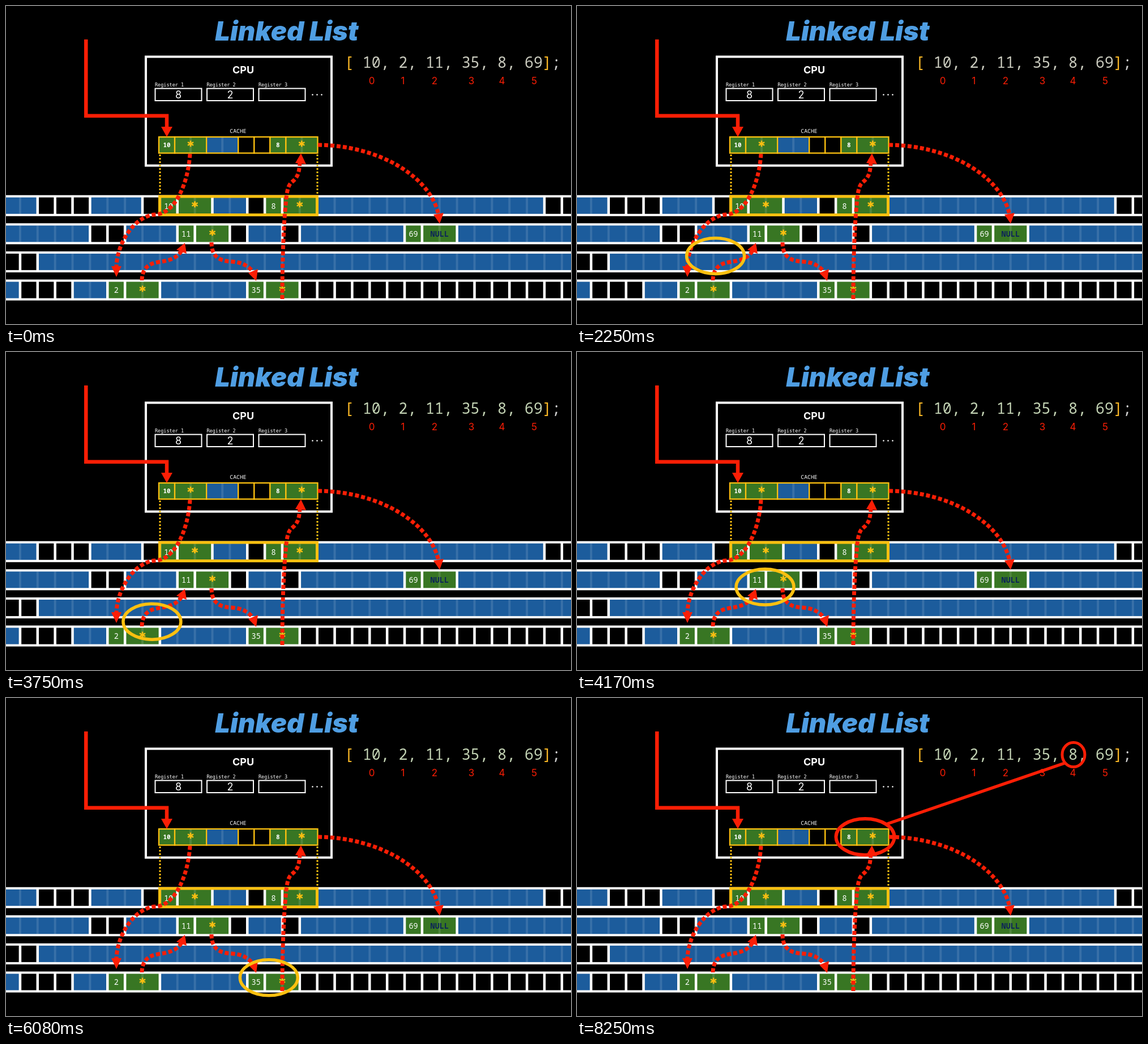
An HTML page for the animation above (9.54 s loop, 998 px wide and 561 px high).

```html
<!DOCTYPE html>
<html lang="en">
<head>
<meta charset="utf-8">
<title>Linked List</title>
<style>
  html, body { margin: 0; width: 100%; height: 100%; overflow: hidden; background: #000; }
  svg { display: block; width: 998px; height: 561px; }
  text { fill: #fff; }
  .mono { font-family: "Noto Sans Mono", monospace; }
  .sans { font-family: Inter, sans-serif; }
  .mid { text-anchor: middle; }
  .star { font: bold 21px "DejaVu Sans Mono", monospace; fill: #fcc010; stroke: #fcc010; stroke-width: .8; text-anchor: middle; }
  .line { fill: none; stroke: #fb1e05; stroke-width: 6.5; }
  .dots { stroke-width: 7; stroke-dasharray: 7 4; }
  .head { fill: #fb1e05; }
  .white { fill: none; stroke: #fff; stroke-width: 2; }
  .gold { fill: none; stroke: #fcc010; }
</style>
</head>
<body>
<svg viewBox="0 0 998 561">
  <text class="mid" x="496" y="61" style="font:italic 900 47px Inter,sans-serif;fill:#4f9ee3">Linked List</text>
  <text id="array" class="mono" x="598" y="109" font-size="26.5"><tspan fill="#fcb926">[</tspan> 10, 2, 11, 35, 8, 69<tspan fill="#fcb926">]</tspan><tspan fill="#d0d0d0">;</tspan></text>
  <g id="indices"></g>

  <rect class="white" x="247" y="89.5" width="328" height="192" style="stroke-width:4"/>
  <text class="sans mid" x="419" y="119" font-size="18" font-weight="700">CPU</text>
  <g id="registers"></g>
  <text class="mono mid" x="410" y="224" font-size="9.8" font-weight="500">CACHE</text>
  <g id="cache"></g>
  <g id="memory"></g>

  <path class="gold" d="M272,262V336M550,262V336" stroke-width="3" stroke-dasharray="3 3"/>
  <rect class="gold" x="271.5" y="336" width="278" height="32.5" stroke-width="5"/>

  <path class="line" d="M141.3,59V193.8H284V215"/>
  <path class="head" d="M274,213H294L284,231Z"/>
  <g class="line dots">
    <path d="M325,261C322,310 300,368 262,368C225,372 196,420 195,460"/>
    <path d="M240,484C241,452 265,453 280,450C296,447 306,440 311,430"/>
    <path d="M363,417C363,445 380,450 400,451C418,452 430,460 437,470"/>
    <path d="M488,517C488,440 491,380 494,350C497,310 503,314 510,306C517,298 518,290 519,276"/>
    <path d="M551,245C660,246 750,302 764,368"/>
  </g>
  <path class="head" d="M186,459H204L195,478ZM301,430L319,437L316,418ZM428,471L445,464L442,485ZM511,277L530,279L521,260ZM755,368L773,365L766,384Z"/>

  <ellipse id="cursor" class="gold" rx="51" ry="31.5" stroke-width="5.5"/>
  <g id="found" class="line">
    <ellipse cx="509" cy="245" rx="51.5" ry="32" style="stroke-width:6"/>
    <path d="M548,222L861,115" stroke-width="5.5"/>
    <ellipse cx="877" cy="100" rx="20" ry="21.5" style="stroke-width:5"/>
  </g>
</svg>
<script>
const $ = id => document.getElementById(id);
const BLUE = "#1c5c9c", GREEN = "#387623";

const rect = (x, y, w, h, fill) =>
  `<rect x="${x}" y="${y}" width="${w}" height="${h}" fill="${fill}"/>`;
const label = (x, y, size, text, extra = "") =>
  `<text class="mono mid" x="${x}" y="${y}" font-size="${size}" ${extra}>${text}</text>`;
const star = (x, y) => `<text class="star" x="${x}" y="${y}">*</text>`;

// Tokens: "." free slot, "b7" seven used slots, "*" or "NULL" pointer, number = value
function parse(token) {
  if (token === ".") return { slots: 1, fill: "#000" };
  if (token[0] === "b") return { slots: +token.slice(1), fill: BLUE };
  return { slots: /\d/.test(token) ? 1 : 2, fill: GREEN, text: token };
}

function cells(tokens, x, y, pitch, gap, height, draw) {
  let out = "";
  for (const token of tokens.split(" ")) {
    const { slots, fill, text } = parse(token);
    const width = slots * pitch - gap;
    out += rect(x, y, width, height, fill);
    for (let i = 1; i < slots; i++)
      out += rect(x + i * pitch - gap / 2 - 2, y, 4, height, "rgba(255,255,255,.12)");
    out += draw(text, x, width);
    x += slots * pitch;
  }
  return out;
}

const rows = [
  "b2 . . . b3 . 10 * b2 . 8 * b13 . .",
  "b5 . . b3 11 * . b2 . b6 69 NULL b7",
  ". . b31",
  "b1 . . . b2 2 * b5 35 *" + " .".repeat(16)
];
$("memory").innerHTML = rows.map((tokens, i) => {
  const y = 337.7 + i * 49.6;
  return rect(0, y - 4, 998, 37, "#fff") +
    cells(tokens, -3.7, y, 30.87, 4.5, 29, (text, x, w) => {
      const cx = x + w / 2;
      if (!text) return "";
      if (text === "*") return star(cx, y + 23.2);
      return label(cx, y + 19.8, 13.5, text,
        text === "NULL" ? 'font-weight="700" style="fill:#0c2458"' : "");
    });
}).join("");

$("cache").innerHTML = cells("10 * b2 . . 8 *", 270, 231, 28.05, 0, 28, (text, x, w) =>
  `<rect class="gold" x="${x}" y="231" width="${w}" height="28.5" stroke-width="2.3"/>` +
  (!text ? "" : text === "*" ? star(x + w / 2, 253.7)
    : label(x + w / 2, 249, 11, text, 'font-weight="600"')));

$("registers").innerHTML = ["8", "2", ""].map((value, i) => {
  const x = 263.5 + i * 91.5;
  return `<rect class="white" x="${x}" y="145.5" width="82" height="21.5"/>
    <text x="${x - .5}" y="142" style="font:8.5px 'DejaVu Sans Mono',monospace">Register ${i + 1}</text>
    <text class="sans mid" x="${x + 41}" y="162.5" font-size="18">${value}</text>`;
}).join("") + [541.5, 549.5, 557.5].map(x => `<circle cx="${x}" cy="156.5" r="1.3" fill="#fff"/>`).join("");

$("indices").innerHTML = [646, 701, 757, 822, 876, 933].map((x, i) =>
  `<text class="sans mid" x="${x}" y="138" font-size="17" style="fill:#fb1e05">${i}</text>`).join("");

const LOOP = 9540, SHOW = 1500, FOUND = 7790;
const START = [305, 243];
// start time, duration, destination
const moves = [
  [1540, 1050, 226, 502],
  [3410, 1000, 348.5, 401],
  [5260, 1000, 474, 501],
  [6750, 570, 509, 245]
];

function cursorAt(time) {
  let [x, y] = START;
  for (const [start, duration, toX, toY] of moves) {
    const u = Math.min(1, Math.max(0, (time - start) / duration));
    const eased = (1 - Math.cos(Math.PI * u)) / 2;
    x += (toX - x) * eased;
    y += (toY - y) * eased;
  }
  return [x, y];
}

function frame() {
  const time = performance.now() % LOOP;
  const [x, y] = cursorAt(time);
  const cursor = $("cursor");
  cursor.setAttribute("cx", x);
  cursor.setAttribute("cy", y);
  cursor.style.display = time >= SHOW && time < FOUND ? "" : "none";
  $("found").style.display = time >= FOUND ? "" : "none";
  $("array").style.fill = time < 2460 ? "#cbccbf" : "#c3d3b4";
  requestAnimationFrame(frame);
}
frame();
</script>
</body>
</html>
```
